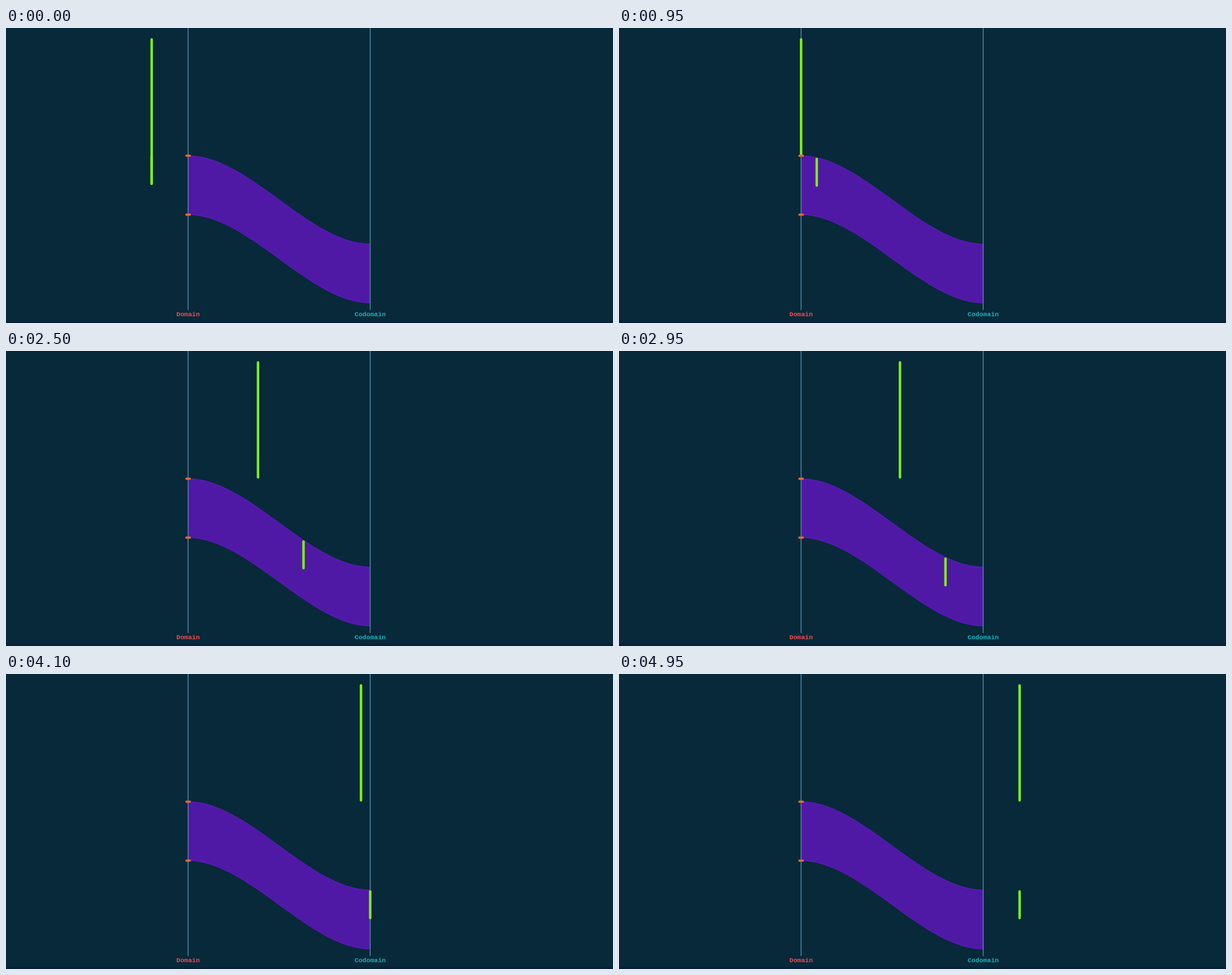
An HTML page that plays this animation: 1074 px wide and 522 px high, repeating every 5000 ms.

```html
<!DOCTYPE html>
<html lang="en">
<head>
<meta charset="utf-8">
<title>Domain and codomain</title>
<style>
  html, body { margin: 0; width: 100%; height: 100%; overflow: hidden; background: #07293a; }
  svg { display: block; width: 1074px; height: 522px; }
  text { font: bold 11.5px "Liberation Mono", "DejaVu Sans Mono", monospace; text-anchor: middle; }
  .axis { stroke: #5b8fb3; stroke-width: 1.4; }
  .tick { stroke: #e0682f; stroke-width: 4; stroke-linecap: round; }
  .bar { fill: #7fee14; }
</style>
</head>
<body>
<svg viewBox="0 0 1074 522">
  <rect y="518.5" width="1074" height="3.5" fill="#0a2038"/>
  <path fill="#5019a5" d="M322.2 226C429.6 226 537 382.2 644.4 382.2V486.4C537 486.4 429.6 330.2 322.2 330.2Z"/>
  <path fill="none" stroke="#6d16dc" d="M322.2 226C429.6 226 537 382.2 644.4 382.2M322.2 330.2C429.6 330.2 537 486.4 644.4 486.4"/>
  <path class="axis" d="M322.2 0V499M644.4 0V499"/>
  <rect class="bar" id="upper" y="18" width="4.4" rx="2.2"/>
  <rect class="bar" id="lower" width="4.4" height="51.5" rx="2.2"/>
  <path class="tick" d="M319.2 226h6M319.2 330.2h6"/>
  <text x="322.2" y="510.3" fill="#f4494c">Domain</text>
  <text x="644.4" y="510.3" fill="#12b5bd">Codomain</text>
</svg>
<script>
const LOOP = 5000, STEP = 50, DOMAIN = 322.2, SPAN = 322.2, MARGIN = 64.44, DROP = 156.2;
const upper = document.getElementById("upper");
const lower = document.getElementById("lower");
const clamp = v => Math.min(1, Math.max(0, v));
const ease = p => p * p * (3 - 2 * p);

// The clock runs through 7 equal parts: approach, a crossing of 4 for each bar
// (the lower one starts one part earlier), and departure.
function draw(ms) {
  const u = Math.floor((ms % LOOP) / STEP) * STEP / (LOOP - STEP) * 7;
  const cross = start => clamp((u - start) / 4);
  const x = p => DOMAIN + MARGIN * (clamp(u) - 1 + clamp(u - 6)) + SPAN * p - 2.2;
  const low = cross(1);
  upper.setAttribute("x", x(cross(2)));
  upper.setAttribute("height", u < 1 ? 259.8 : 207.7);
  lower.setAttribute("x", x(low));
  lower.setAttribute("y", 226.3 + DROP * ease(low));
}

const begin = performance.now();
function tick() {
  draw(performance.now() - begin);
  requestAnimationFrame(tick);
}
tick();
</script>
</body>
</html>
```
